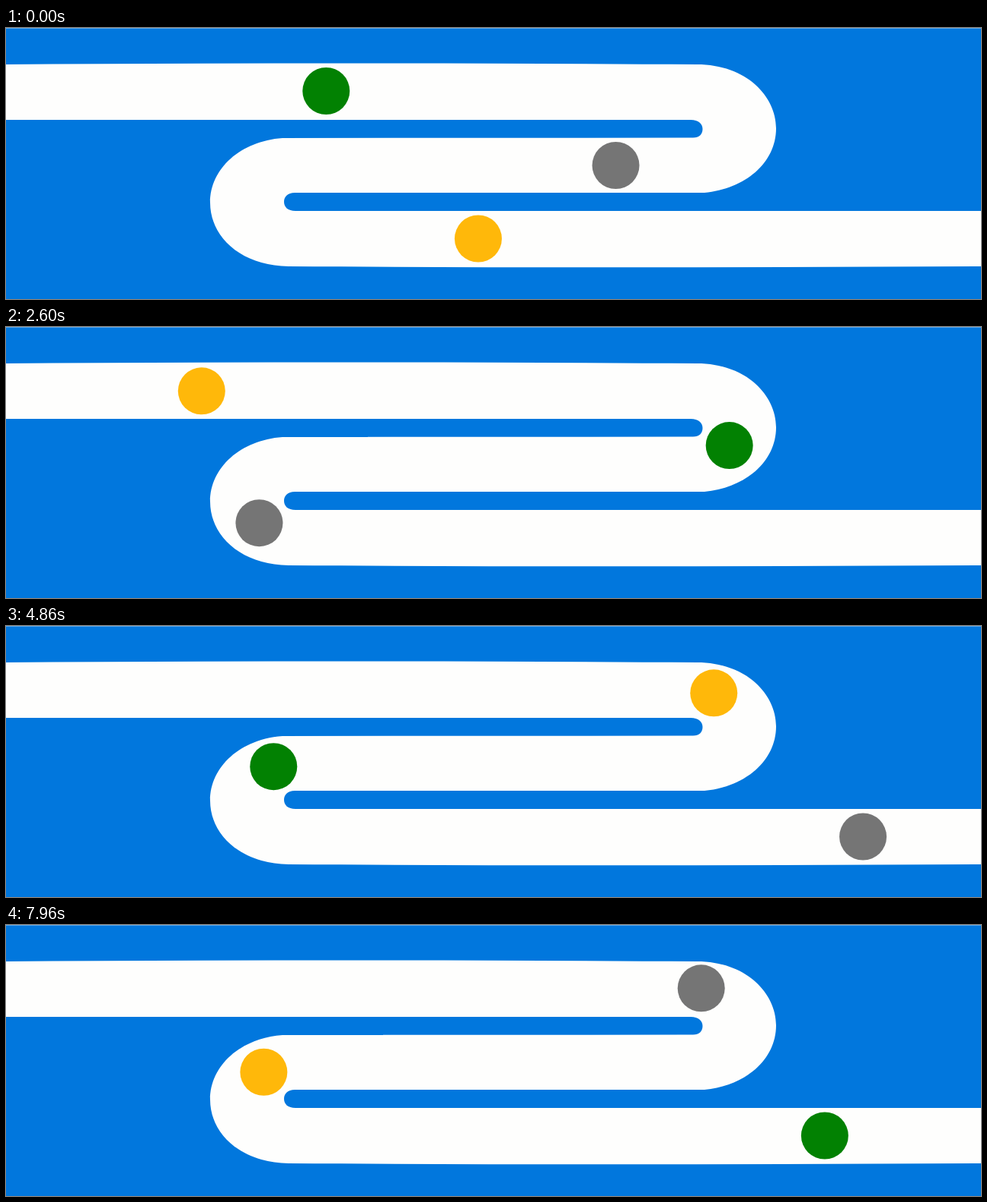
An HTML page without scripts for the animation above (8000 ms loop, 1280 px wide and 357 px high).

```html
<!DOCTYPE html>
<html lang="en">
<head>
<meta charset="utf-8">
<title>Balls on a winding track</title>
<style>
  html, body { margin: 0; width: 100%; height: 100%; overflow: hidden; background: #0177dd; }
  .stage { position: absolute; left: 0; top: 0; width: 1280px; height: 357px; overflow: hidden; }
  svg { display: block; }

  .ball {
    position: absolute; left: 0; top: 0;
    width: 62px; height: 62px; border-radius: 50%;
    offset-path: path("M-40 83H907A49 49 0 0 1 907 181H371A48.25 48.25 0 0 0 371 277.5H1320");
    offset-rotate: 0deg;
    animation: 8s linear infinite;
  }
  .green { background: #028102; animation-name: green; }
  .grey { background: #757575; animation-name: grey; }
  .yellow {
    background: #ffb80a; animation-name: yellow;
    offset-path: path("M-40 86L500 83H907A49 49 0 0 1 907 181H371A48.25 48.25 0 0 0 371 277.5H1320");
  }

  /* Bends: 947-1100.9 and 1636.9-1788.5 along the track */
  @keyframes green {
    0% { offset-distance: 460px; }
    21.96% { offset-distance: 947px; }
    25.4% { offset-distance: 985.5px; }
    32.5% { offset-distance: 1048.9px; }
    38.81% { offset-distance: 1100.9px; }
    58.93% { offset-distance: 1636.9px; }
    62.5% { offset-distance: 1676.1px; }
    71.25% { offset-distance: 1754.4px; }
    75.13% { offset-distance: 1788.5px; }
    100% { offset-distance: 2505.9px; }
  }
  @keyframes grey {
    0% { offset-distance: 1206.9px; }
    20.48% { offset-distance: 1636.9px; }
    24.2% { offset-distance: 1674.8px; }
    32.5% { offset-distance: 1743.3px; }
    38.95% { offset-distance: 1788.5px; }
    66.42% { offset-distance: 2737.5px; }
    66.43% { offset-distance: 0px; }
    99.06% { offset-distance: 947px; }
    100% { offset-distance: 959px; }
  }
  @keyframes yellow {
    0% { offset-distance: 2036.5px; }
    20.93% { offset-distance: 2737.5px; }
    20.94% { offset-distance: 9.5px; }
    58.7% { offset-distance: 947px; }
    62.14% { offset-distance: 985.5px; }
    71.25% { offset-distance: 1060.1px; }
    76.34% { offset-distance: 1100.9px; }
    96.4% { offset-distance: 1636.9px; }
    99.5% { offset-distance: 1672.4px; }
    100% { offset-distance: 1677px; }
  }
</style>
</head>
<body>
<div class="stage">
  <svg width="1280" height="357" viewBox="0 0 1280 357">
    <rect width="1280" height="357" fill="#0177dd"/>
    <rect width="1280" height="1" fill="#5fa8e6"/>
    <path fill="#fefefd" d="M0 48C300 46 620 46 907 48C972 48 1011 90 1011 132
      C1011 178 970 212 917 217H379C370 217 365 222 365 229C365 236 370 241 380 241
      H1280V314C980 315.5 660 316 371 314C308 313 268 275 268 230C268 185 308 149 363 145
      L902 144.5C910 144.5 914.5 140 914.5 133C914.5 126 909 121 899 121H0Z"/>
  </svg>
  <div class="ball green"></div>
  <div class="ball grey"></div>
  <div class="ball yellow"></div>
</div>
</body>
</html>
```
